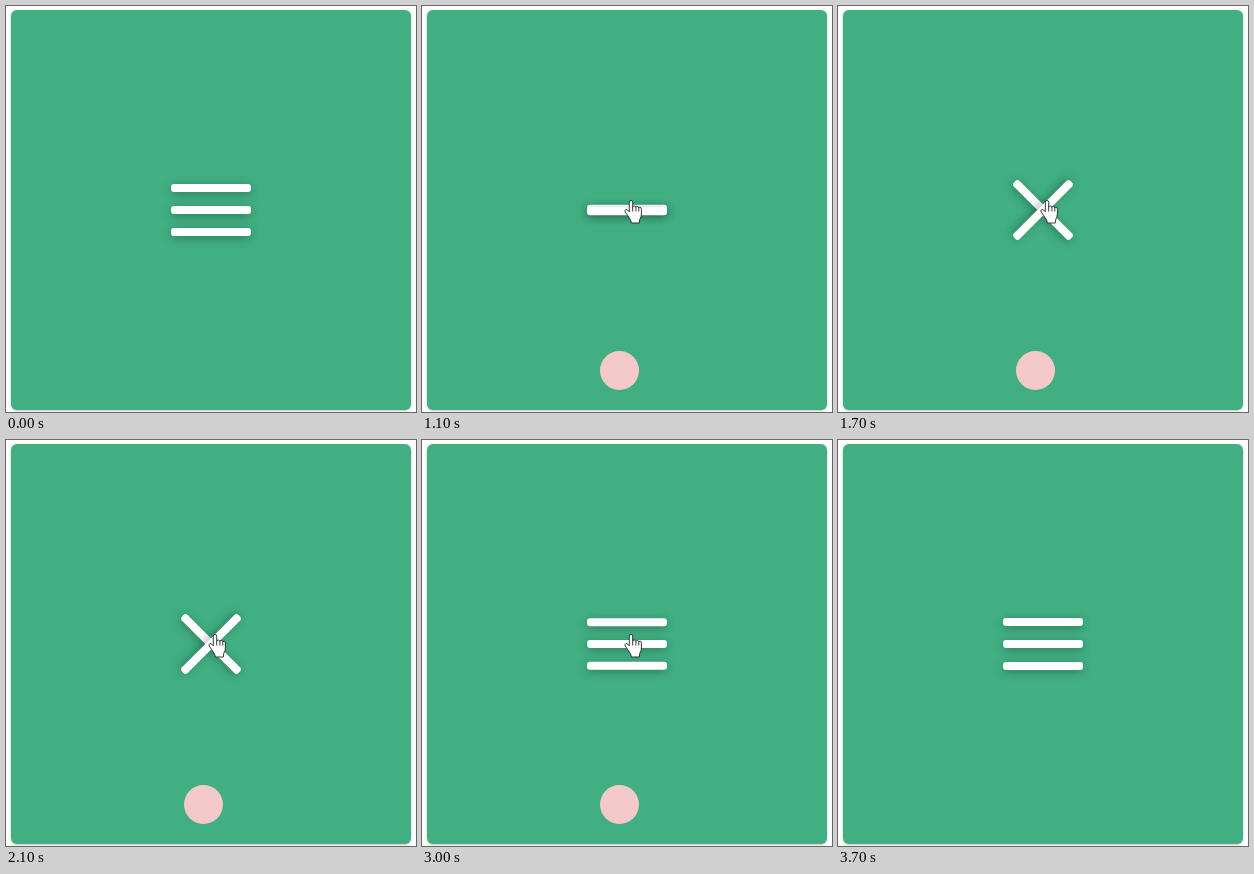
Recreate the animation shown at these times as an HTML page. Size 410 by 406 pixels, loop 4100 ms.

```html
<!DOCTYPE html>
<html lang="en">
<head>
<meta charset="utf-8">
<title>Menu toggle</title>
<style>
  html, body { margin: 0; width: 100%; height: 100%; overflow: hidden; background: #fff; }
  .card {
    position: absolute; left: 5px; top: 4px; width: 400px; height: 400px;
    border-radius: 6px; background: #41af82; box-shadow: 0 1px 3px rgba(0, 0, 0, .25);
  }
  .line {
    position: absolute; left: 160px; width: 80px; height: 8px;
    border-radius: 3px; background: #fff; box-shadow: 0 2px 10px rgba(0, 0, 0, .3);
  }
  #top { top: 174px; }
  #mid { top: 196px; }
  #low { top: 218px; }
  #badge {
    position: absolute; left: 178px; top: 345px; width: 39px; height: 39px;
    box-sizing: border-box; border-radius: 50%; background: #f4c9c9;
  }
  svg { position: absolute; left: 0; top: 0; }
</style>
</head>
<body>
<div class="card">
  <div class="line" id="top"></div>
  <div class="line" id="mid"></div>
  <div class="line" id="low"></div>
</div>
<div id="badge"></div>
<svg width="410" height="406">
  <g id="hand" stroke="#222" stroke-width=".9" stroke-linejoin="round">
    <path fill="#fff" d="M207.3 196.2a1.7 1.7 0 0 1 3.4 0V201.5q.3-1.6 1.7-1.5 1.3 0 1.5 1.5.3-1.2 1.5-1.1 1.2.1 1.4 1.5.3-.9 1.4-.7 1.2.2 1.2 1.9V208q0 3-1.6 5.2l-.5 3.8h-8l-.6-2.8q-1.5-2.2-3-4.6l-2.4-3.4q-.9-1.6.4-2.4 1.3-.7 2.6.8l1 1.2z"/>
    <path fill="none" d="M210.7 201.5v4M213.9 201.5v4M216.8 202v3.5"/>
  </g>
</svg>
<script>
const LOOP = 4100, STEP = 100, OPEN = 880, CLOSE = 2387, SPAN = 700, LEAVE = 3700;
const [topLine, midLine, lowLine, badge, hand] =
  ['top', 'mid', 'low', 'badge', 'hand'].map(id => document.getElementById(id));

const clamp = x => Math.min(1, Math.max(0, x));
const ease = x => 1 - (1 - clamp(x)) ** 3;

// Opening slides the bars together, then turns them; closing does the reverse.
function pose(t) {
  if (t < CLOSE) {
    const k = (t - OPEN) / SPAN;
    return { slide: ease(2 * k), turn: ease(2 * k - 1), scale: 1 - ease(k) };
  }
  const k = (t - CLOSE) / SPAN;
  return { slide: 1 - ease(2 * k - 1), turn: 1 - ease(2 * k), scale: ease(k) };
}

function draw(t) {
  const { slide, turn, scale } = pose(t);
  topLine.style.transform = `translateY(${22 * slide}px) rotate(${45 * turn}deg)`;
  lowLine.style.transform = `translateY(${-22 * slide}px) rotate(${135 * turn}deg)`;
  midLine.style.transform = `scale(${scale})`;
  midLine.style.opacity = scale;

  const here = t < LEAVE;
  badge.style.opacity = here ? clamp((t - 620) / 180) : 0;
  hand.style.display = here && t >= 200 ? '' : 'none';
  const away = 1 - ease((t - 100) / 400);
  hand.setAttribute('transform', `translate(${20 * away} ${200 * away})`);
}

function tick() {
  const t = performance.now() % LOOP;
  draw(Math.floor(t / STEP) * STEP);
  requestAnimationFrame(tick);
}
tick();
</script>
</body>
</html>
```
